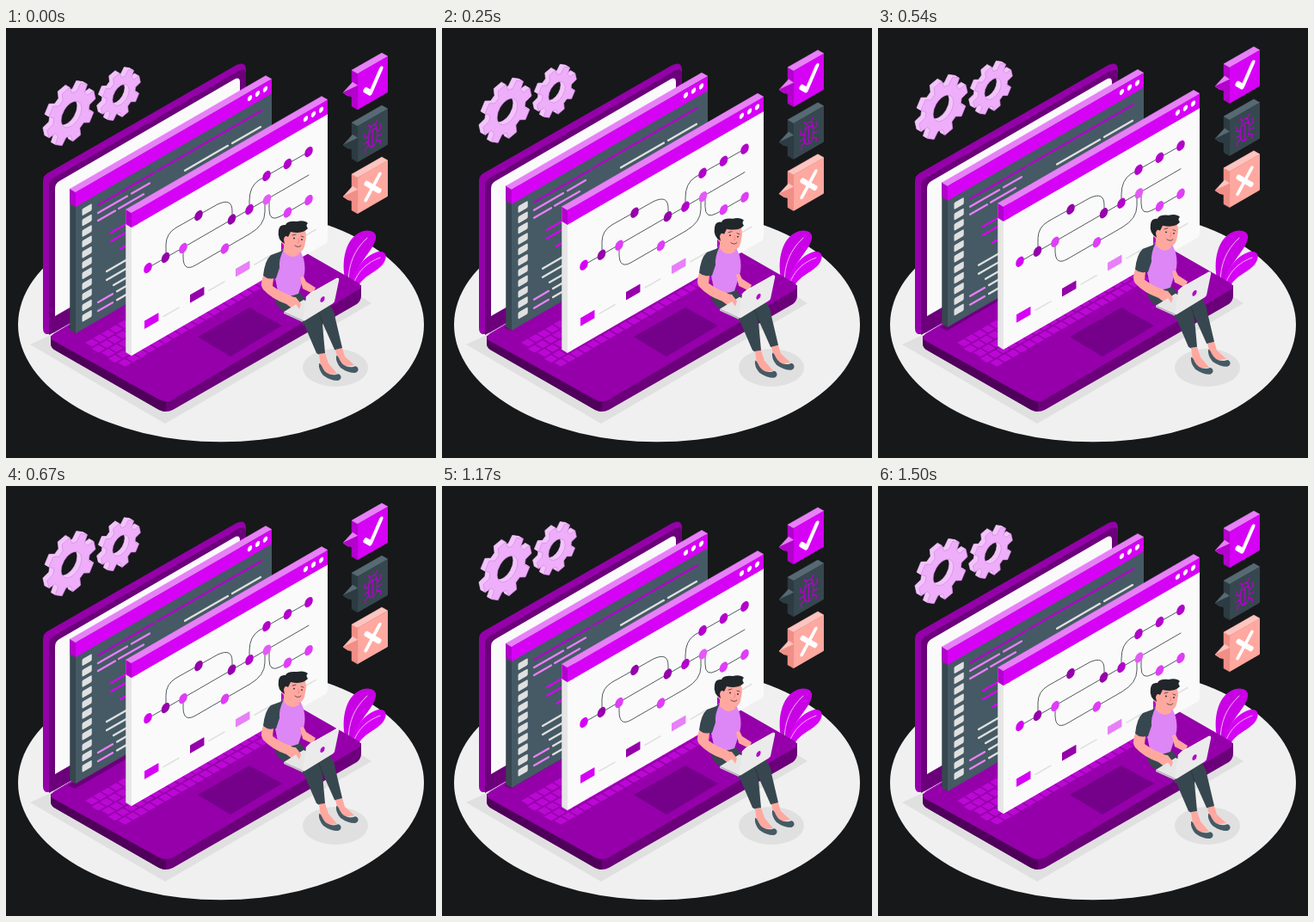
Write an HTML page that moves like this. It is 500 by 500 pixels and loops after 1.54 s.

```html
<!DOCTYPE html>
<html lang="en">
<head>
<meta charset="utf-8">
<style>
html, body { margin: 0; height: 100%; overflow: hidden; background: #17181a; }
svg { display: block; width: 100vw; height: 100vh; }
</style>
</head>
<body>
<svg id="stage" viewBox="0 0 500 500"></svg>
<script>
const SLOPE = 0.577;
const C = {
  main: '#d602f5', mid: '#b302cc', deep: '#9500aa', dark: '#6b007a', light: '#e880f8',
  slate: '#455a64', ink: '#37474f', grey: '#e0e0e0', white: '#fafafa',
  skin: '#ffa8a0', hair: '#20262a'
};

const path = (d, fill, extra = '') => `<path d="${d}" fill="${fill}" ${extra}/>`;
const line = (d, stroke, width, extra = '') =>
  `<path d="${d}" fill="none" stroke="${stroke}" stroke-width="${width}" stroke-linecap="round" stroke-linejoin="round" ${extra}/>`;
const poly = (points, fill) =>
  `<polygon points="${points}" fill="${fill}" stroke="${fill}" stroke-width=".5" stroke-linejoin="round"/>`;
// Places content on the vertical isometric plane that faces the viewer.
const plane = (x, y, content) => `<g transform="matrix(.866 -.5 0 1 ${x} ${y})">${content}</g>`;
const dot = (x, y, r, fill) => plane(x, y, `<circle r="${r}" fill="${fill}"/>`);
const rect = (x, y, w, h, fill, r = 0) =>
  `<rect x="${x}" y="${y}" width="${w}" height="${h}" rx="${r}" fill="${fill}"/>`;
// A line that climbs along the isometric axis.
const climb = (x1, y1, x2, stroke, width) =>
  line(`M${x1} ${y1}L${x2} ${y1 - (x2 - x1) * SLOPE}`, stroke, width);

function ground() {
  return '<ellipse cx="250" cy="345" rx="236" ry="136.300" fill="#f0f0f0"/>' +
    path('M28 368L185 460L425 320L300 240Z', C.grey) +
    `<ellipse cx="383" cy="395" rx="38" ry="22" fill="${C.grey}"/>`;
}

function plant() {
  return path('M396 299C389 276 393 249 409 239C420 232 432 236 430 245C427 259 411 270 403 294Z', '#c802e4') +
    path('M401 302C404 278 420 263 433 260C443 259 444 267 438 275C428 286 414 288 408 304Z', C.main) +
    line('M398 297C398 274 405 258 420 244M404 298C409 282 421 272 435 267', '#f6c8fc', 0.9);
}

function laptop() {
  let out = path('M43 178Q43 172 48 169L268 43Q279 38 279 49V226L56 354Q43 360 43 349Z', C.deep) +
    path('M50 184Q50 177 56 174L270 50Q279 45 279 54V226L50 357Z', C.dark) +
    path('M57 187Q57 181 62 178L265 60Q272 56 272 63V211L57 335Z', C.white) +
    path('M52 358V367Q52 371 56 374L178 444Q186 448 194 444L408 321Q413 317 413 311V299L280 300Z', C.dark) +
    path('M52 358V367Q52 371 56 374L178 444Q182 446 186 446V430Z', '#4f005a') +
    path('M54 363Q50 359 56 355L273 226Q280 222 287 226L409 296Q416 300 409 305L194 432Q186 436 178 432Z', C.deep) +
    path('M72 348L280 228L288 232L80 352Z', C.dark);
  for (let row = 0; row < 5; row++) {
    for (let key = 0; key < 19; key++) {
      const x = 92 + row * 9.6 + key * 9.4 - (row % 2) * 2;
      const y = 366 + row * 5.8 - key * 5.42 + (row % 2) * 1.15;
      out += path(`M${x} ${y}l7.800 -4.500l8 4.600l-7.800 4.500z`, '#bb08d4');
    }
  }
  return out + path('M223 359L283 325L321 346L261 382Z', '#75008a');
}

function panel(x, y, h, body, side) {
  const dx = 228, rise = dx * SLOPE;
  let out = poly(`${x - 6.5},${y - 4} ${x},${y} ${x},${y + h} ${x - 6.5},${y + h - 4}`, side) +
    poly(`${x - 6.5},${y - 4} ${x},${y} ${x},${y + 17} ${x - 6.5},${y + 13}`, C.mid) +
    poly(`${x - 6.5},${y - 4} ${x + dx - 7},${y - rise - 4} ${x + dx},${y - rise} ${x},${y}`, C.light) +
    plane(x, y, rect(0, 0, 263.3, h, body, 4) + rect(0, 0, 263.3, 17, C.main) + rect(0, 10, 5, h - 10, body) + rect(0, 0, 9, 17, C.main));
  for (const step of [0, 9, 18]) out += dot(x + 202.5 + step, y - 109.5 - step * SLOPE, 3.1, C.white);
  return out;
}

function codeWindow() {
  let out = panel(81, 191, 164, C.slate, C.ink);
  for (let i = 0; i < 11; i++) out += plane(88.5, 210.5 + i * 12.35, rect(0, 0, 13, 8, C.grey, 1.5));
  const rows = [
    [107, 206, 172, C.mid], [176, 166, 297, C.mid],
    [107, 215, 141, C.light], [146, 192.5, 167, C.light],
    [107, 224, 127, C.light], [131, 210, 160, C.light], [208, 165.7, 258, C.grey], [263, 134, 296, C.grey],
    [122, 238, 142, C.main], [122, 248, 142, C.main], [133, 257, 145, C.main],
    [117, 283, 145, C.grey], [117, 293, 145, C.grey], [125, 299, 145, C.grey],
    [107, 319, 124, C.light], [129, 306.3, 145, C.grey],
    [107, 329, 124, C.light], [129, 316.3, 145, C.grey]
  ];
  return out + rows.map(([x1, y, x2, color]) => climb(x1, y, x2, color, 2.3)).join('');
}

function graphWindow() {
  let out = panel(146, 215, 166, C.white, '#e6e6e6');
  out += line('M165 279L352 171M186 267V252Q186 239 198 232L246 205Q263 197 263 213V222' +
    'M206 256V266Q206 284 220 276L284 239Q301 229 301 214V199' +
    'M283 211V201Q283 184 294 177L352 144M306 198V211Q306 226 319 219L352 200', '#263238', 0.8);
  const nodes = [
    [C.main, 165, 279], [C.deep, 185.5, 267], [C.deep, 224, 218], [C.deep, 262.5, 222.5],
    [C.mid, 283, 211], [C.mid, 303, 172], [C.mid, 327.5, 158], [C.mid, 352, 144],
    ['#df3df7', 206, 256], ['#df3df7', 254.5, 256.5], ['#e45af7', 303.5, 199.5],
    ['#df3df7', 327.5, 214.5], ['#df3df7', 352, 200]
  ];
  out += nodes.map(([color, x, y]) => dot(x, y, 5.5, color)).join('');
  [C.main, C.deep, C.light, C.mid].forEach((color, i) => {
    const x = 161 + i * 53, y = 340.5 - i * 30.2;
    out += plane(x, y, rect(0, 0, 19, 9.5, color, 0.5)) + climb(x + 22, y - 5, x + 40, C.grey, 1.6);
  });
  return out;
}

function gear(cx, cy, r) {
  const teeth = 8, points = [];
  for (let i = 0; i < teeth; i++) {
    for (const [turn, size] of [[-15, 0.75], [-9.5, 1], [9.5, 1], [15, 0.75]]) {
      const a = (i * 45 - 13 + turn) * Math.PI / 180;
      points.push(`${(Math.cos(a) * r * size).toFixed(2)} ${(Math.sin(a) * r * size).toFixed(2)}`);
    }
  }
  const hole = r * 0.42;
  const d = `M${points.join('L')}ZM${hole} 0A${hole} ${hole} 0 1 0 ${-hole} 0A${hole} ${hole} 0 1 0 ${hole} 0Z`;
  let out = '';
  for (let depth = 5; depth >= 0; depth--) {
    const fill = depth ? '#f3c4fb' : '#eeaefa';
    out += plane(cx - depth, cy - depth * SLOPE,
      path(d, fill, `fill-rule="evenodd" stroke="${depth ? fill : '#cf86de'}" stroke-width=".6"`));
  }
  return out;
}

function badge(y, face, side, top, icon) {
  const dark = poly(`402,${y - 4} 409,${y} 409,${y + 42} 402,${y + 38}`, side);
  const tail = poly(`392,${y + 22} 403,${y + 10} 409,${y + 14} 398,${y + 26}`, top) +
    poly(`392,${y + 22} 398,${y + 26} 409,${y + 29} 409,${y + 14}`, side);
  return dark + poly(`402,${y - 4} 437,${y - 24} 444,${y - 20} 409,${y}`, top) +
    plane(409, y, rect(0, 0, 40.4, 42, face, 1)) + tail + plane(426.5, y + 10, icon);
}

function badges() {
  const check = line('M-10 4L-3 11L11 -10', '#fff', 5.6);
  const cross = line('M-9 -8L9 10M9 -9L-9 11', '#fff', 5.2);
  const bug = line('M-6 -3Q0 -9 6 -3V5Q5 14 0 14Q-5 14 -6 5ZM0 -6V14M-5 -4Q-5 -11 0 -11Q5 -11 5 -4' +
    'M-3 -10L-6 -14M3 -10L6 -14M-6 0L-11 -2V-7M6 0L11 -2V-7M-6 5H-12M6 5H12M-5 9L-10 12V16M5 9L10 12V16', C.mid, 1.4);
  return badge(53, C.main, C.mid, C.light, check) +
    badge(114, C.ink, '#2d3b42', '#576a73', bug) +
    badge(174, C.skin, '#f08f87', '#ffc4bf', cross);
}

function person() {
  const legs = path('M345 318L372 318Q382 326 383 338L391 372Q387 377 382 374L366 338L345 346Z', C.ink) +
    path('M313 306Q311 318 318 326L346 343L361 378Q366 382 371 378L368 345Q367 330 354 324L340 305Z', C.ink) +
    line('M368 345Q367 332 357 325', '#263238', 0.7);
  const shoe = 'M0 0Q-1 7 5 14Q13 20 22 20Q27 18 25 14Q23 11 20 13Q9 15 4 5Q2 0 0 0Z';
  const feet = path('M383 374L391 372L394 382L405 392L393 394L386 386Z', C.skin) +
    path('M364 379L371 378L375 390L385 402L374 403L366 394Z', C.skin) +
    path(shoe, C.slate, 'transform="translate(384 381)"') +
    path(shoe, C.slate, 'transform="translate(364 390)"');
  const body = path('M324 255L341 256L346 268Q349 280 346 291L340 309Q326 315 316 306L312 286L313 266Z', '#dd86f5') +
    path('M323 246L337 251L341 263Q332 270 323 260Z', C.skin) +
    path('M319 260L323 257Q317 269 318 279L314 291Q304 294 299 288Q301 270 308 264Z', C.ink);
  const head = path('M322 235L345 231Q351 238 348 249Q347 259 341 261Q332 261 327 254Q320 252 320 246Z', C.skin) +
    path('M324 251Q315 246 317 235Q318 228 325 229Q327 224 338 225Q347 223 351 227Q348 229 351 233Q345 240 331 237L328 243Q324 240 323 246Z', C.hair) +
    `<circle cx="335" cy="244.500" r=".9" fill="${C.hair}"/><circle cx="344" cy="246" r=".9" fill="${C.hair}"/>` +
    line('M333 241L337 240M343 242L346 243M336 253Q340 256 343 253', C.hair, 0.7) +
    line('M340 245L341 249L339 250', '#e57f78', 0.7);
  const arms = path('M299 288Q305 293 311 291L310 300Q321 308 331 311L340 317L343 325L334 327L326 321Q309 315 299 304Q295 299 299 288Z', C.skin) +
    path('M342 290L346 289L349 295L360 302L357 309L345 303Z', C.skin);
  const computer = path('M323 330L346 316L365 326L345 340Z', '#e6e6e6') +
    path('M323 330L345 340V342L323 332Z', '#c7c7c7') +
    path('M349 313Q350 311 353 309L385 291Q388 290 387 294L382 318Q381 320 379 321L348 340Q344 342 345 338Z', '#ebebeb') +
    line('M349 313L353 309L385 291', '#fff', 1) +
    dot(368, 315.5, 3, C.mid);
  const hand = path('M326 312L337 313L343 321L341 327L337 321L332 322Z', C.skin);
  return legs + feet + body + head + arms + computer + hand;
}

document.getElementById('stage').innerHTML = ground() + plant() + laptop() +
  `<g id="floating">${gear(76, 100.5, 32.5)}${gear(133.5, 78, 26.5)}${codeWindow()}${graphWindow()}${badges()}${person()}</g>`;

const floating = document.getElementById('floating');
const LOOP = 1540, STEPS = 37, PEAK = 17.6, RISE = 0.555;

function draw() {
  const step = Math.floor((performance.now() % LOOP) / LOOP * STEPS + 0.1);
  const lift = Math.max(0, PEAK - Math.abs(step - PEAK)) * RISE;
  floating.setAttribute('transform', `translate(0 ${-lift.toFixed(2)})`);
  requestAnimationFrame(draw);
}
draw();
</script>
</body>
</html>
```
